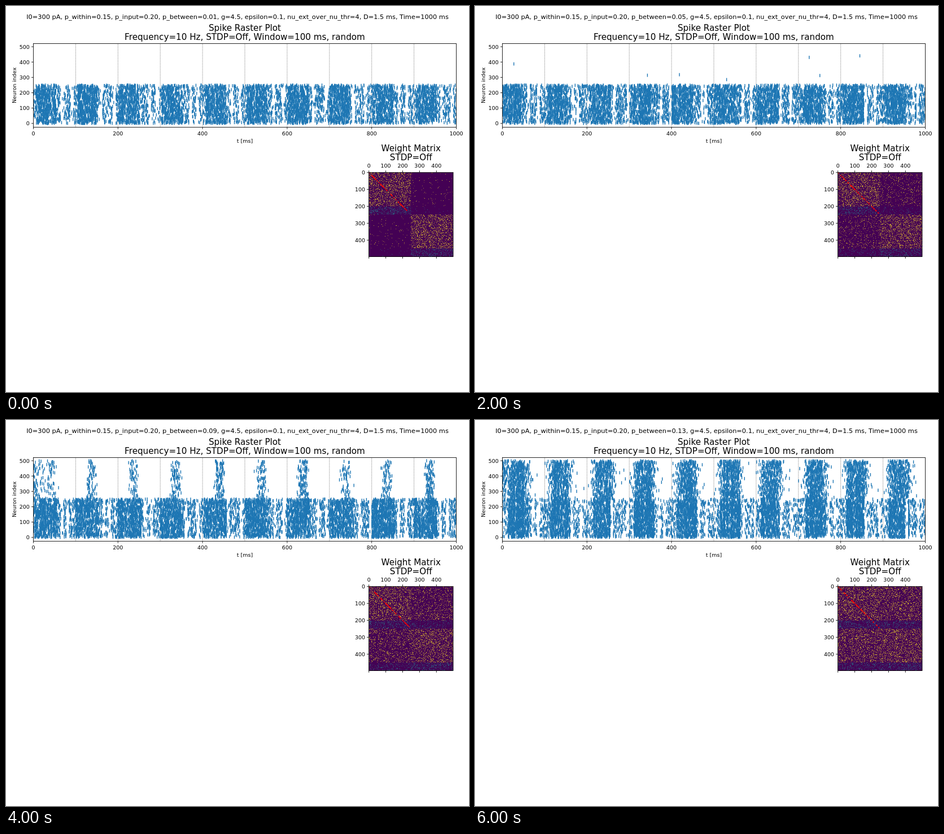
Recreate the animation shown at these times as an HTML page with a canvas. Size 820x683 px, loop 8 s.

```html
<!DOCTYPE html>
<html lang="en">
<head>
<meta charset="utf-8">
<title>Spike raster and weight matrix</title>
<style>
  html, body { margin: 0; width: 100%; height: 100%; overflow: hidden; background: #fff; }
  canvas { display: block; }
</style>
</head>
<body>
<canvas id="stage" width="820" height="683"></canvas>
<script>
const W = 820, H = 683, HOLD = 2000;
const FONT = '"DejaVu Sans", sans-serif';
const SMALL = 9.49, MEDIUM = 11.35, LARGE = 15.16;
const raster = { x: 48.5, y: 66.5, w: 749, h: 148 };
const matrix = { x: 642.5, y: 294.5, w: 149.5, h: 149 };
const tx = ms => raster.x + ms * 0.749;
const ny = n => 207.8 - n * 0.2715;

// Rates are spikes per pixel of time axis; from, to and half are ms within a 100 ms cycle.
const scenes = [
  { p: 0.01, dense: 19, mid: 7, from: 4, to: 52, burst: 0, half: 20, vary: 0 },
  { p: 0.05, dense: 19, mid: 8.5, from: 4, to: 54, burst: 0.04, half: 24, vary: 0 },
  { p: 0.09, dense: 20, mid: 8, from: 0, to: 56, burst: 10, half: 10, vary: 0.75 },
  { p: 0.13, dense: 23, mid: 6, from: 14, to: 62, burst: 18, half: 22, vary: 0.1 }
];

function random(seed) {
  return () => {
    seed = (seed + 0x6d2b79f5) | 0;
    let t = Math.imul(seed ^ (seed >>> 15), 1 | seed);
    t = (t + Math.imul(t ^ (t >>> 7), 61 | t)) ^ t;
    return ((t ^ (t >>> 14)) >>> 0) / 4294967296;
  };
}

function newCanvas(w, h) {
  const c = document.createElement('canvas');
  c.width = w;
  c.height = h;
  return c;
}

function label(g, text, x, y, size, align = 'center') {
  g.font = size + 'px ' + FONT;
  g.textAlign = align;
  g.fillStyle = '#000';
  g.fillText(text, x, y);
}

function line(g, x1, y1, x2, y2) {
  g.beginPath();
  g.moveTo(x1, y1);
  g.lineTo(x2, y2);
  g.stroke();
}

function frameBox(g, b) {
  g.strokeStyle = '#000';
  g.lineWidth = 0.85;
  g.strokeRect(b.x, b.y, b.w, b.h);
}

// Small differences from one stimulus cycle to the next
const newCycle = (scene, rnd) => ({
  shift: 6 * rnd() - 3,
  power: 1 - scene.vary * rnd(),
  gaps: [56 + 20 * rnd(), 78 + 20 * rnd()]
});

function drivenRate(scene, cycle, phase) {
  if (cycle.gaps.some(gap => Math.abs(phase - gap) < 3.5)) return 1;
  const t = phase - cycle.shift;
  return t > scene.from && t < scene.to ? scene.dense : scene.mid;
}

function burstRate(scene, cycle, phase) {
  const d = (phase - 38 - cycle.shift) / scene.half;
  const bump = Math.exp(-(d ** 4)) + 0.07 * Math.exp(-((d / 1.6) ** 4));
  return scene.burst * cycle.power * bump;
}

function drawSpikes(g, scene, rnd) {
  g.save();
  g.beginPath();
  g.rect(raster.x, raster.y, raster.w, raster.h);
  g.clip();

  g.strokeStyle = '#808080';
  g.lineWidth = 0.7;
  g.setLineDash([1.75, 0.76]);
  for (let ms = 100; ms < 1000; ms += 100) line(g, tx(ms), raster.y + raster.h, tx(ms), raster.y);
  g.setLineDash([]);

  g.fillStyle = '#1f77b4';
  const step = 0.9;
  const scatter = (ms, rate, first) => {
    const count = Math.floor(rate * step * 0.749 + rnd());
    for (let k = 0; k < count; k++) g.fillRect(tx(ms) - 0.7, ny(first + 250 * rnd()) - 2.85, 1.4, 5.7);
  };
  const cycles = Array.from({ length: 10 }, () => newCycle(scene, rnd));
  let flicker = 1;
  for (let ms = 1, i = 0; ms < 1000; ms += step, i++) {
    if (i % 4 === 0) flicker = 0.6 + 0.8 * rnd();
    const cycle = cycles[Math.floor(ms / 100)], phase = ms % 100;
    const onset = scene.burst * Math.exp(-ms / 12);
    scatter(ms, flicker * drivenRate(scene, cycle, phase), 0);
    scatter(ms, flicker * Math.max(onset, burstRate(scene, cycle, phase)), 250);
  }
  g.restore();
}

function drawRaster(g, scene, rnd) {
  drawSpikes(g, scene, rnd);
  frameBox(g, raster);
  const bottom = raster.y + raster.h;
  for (let ms = 0; ms <= 1000; ms += 200) {
    line(g, tx(ms), bottom, tx(ms), bottom + 3.4);
    label(g, ms, tx(ms), 228.5, SMALL);
  }
  for (let n = 0; n <= 500; n += 100) {
    line(g, raster.x - 3.4, ny(n), raster.x, ny(n));
    label(g, n, 41.9, ny(n) + 3.6, SMALL, 'right');
  }
  label(g, 't [ms]', 423, 241.5, SMALL);
  g.save();
  g.translate(17.7, 140.3);
  g.rotate(-Math.PI / 2);
  label(g, 'Neuron index', 0, 0, SMALL);
  g.restore();
  label(g, 'Spike Raster Plot', 423, 44, LARGE);
  label(g, 'Frequency=10 Hz, STDP=Off, Window=100 ms, random', 423, 60, LARGE);
}

function weightImage(pBetween, rnd) {
  const n = 218;
  const c = newCanvas(n, n), g = c.getContext('2d');
  g.fillStyle = '#440154';
  g.fillRect(0, 0, n, n);
  for (let r = 0; r < n; r++) {
    const row = r * 500 / n;
    g.fillStyle = row % 250 >= 200 ? '#26828e' : '#fde725';
    for (let k = 0; k < n; k++) {
      const same = (row < 250) === (k * 500 / n < 250);
      if (rnd() < (same ? 0.15 : pBetween)) g.fillRect(k, r, 1, 1);
    }
  }
  return c;
}

function drawMatrix(g, scene, rnd) {
  const { x, y, w, h } = matrix, unit = w / 500;
  g.imageSmoothingQuality = 'high';
  g.drawImage(weightImage(scene.p, rnd), x, y, w, h);
  g.fillStyle = '#f00';
  for (let k = 0; k < 50; k++) {
    const d = 250 * rnd() * unit;
    g.beginPath();
    g.arc(x + d, y + d, 1, 0, 7);
    g.fill();
  }
  frameBox(g, matrix);
  for (let n = 0; n < 500; n += 100) {
    const px = x + n * unit + 0.2, py = y + n * unit + 0.2;
    line(g, px, y - 3.4, px, y);
    line(g, px, y + h, px, y + h + 3.4);
    line(g, x - 3.4, py, x, py);
    label(g, n, px, 286.2, SMALL);
    label(g, n, 636.1, py + 3.6, SMALL, 'right');
  }
  label(g, 'Weight Matrix', 717.2, 257, LARGE);
  label(g, 'STDP=Off', 717.2, 273, LARGE);
}

function render(scene, i) {
  const c = newCanvas(W, H), g = c.getContext('2d');
  const rnd = random(71 + 19 * i);
  g.fillStyle = '#fff';
  g.fillRect(0, 0, W, H);
  label(g, `I0=300 pA, p_within=0.15, p_input=0.20, p_between=${scene.p.toFixed(2)}, g=4.5, epsilon=0.1, ` +
    'nu_ext_over_nu_thr=4, D=1.5 ms, Time=1000 ms', 410, 22.9, MEDIUM);
  drawRaster(g, scene, rnd);
  drawMatrix(g, scene, rnd);
  return c;
}

const pages = scenes.map(render);
const ctx = document.getElementById('stage').getContext('2d');
const start = performance.now();
let shown = -1;

function tick() {
  const i = Math.floor((performance.now() - start) / HOLD) % pages.length;
  if (i !== shown) {
    ctx.drawImage(pages[i], 0, 0);
    shown = i;
  }
  requestAnimationFrame(tick);
}
tick();
</script>
</body>
</html>
```
